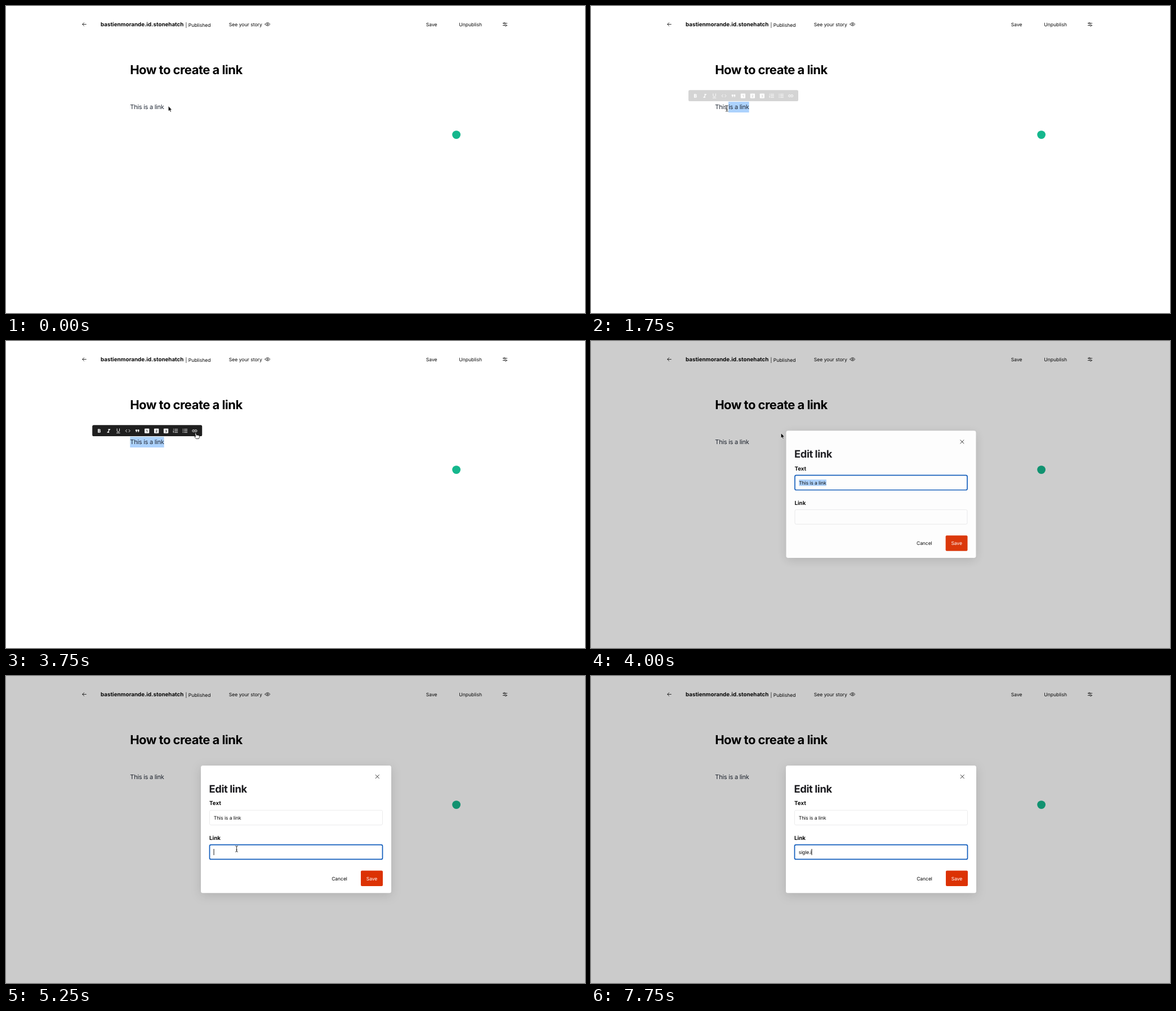
Recreate the animation shown at these times as an HTML page. Size 1028x545 px, loop 8000 ms.

```html
<!DOCTYPE html>
<html lang="en">
<head>
<meta charset="utf-8">
<title>How to create a link</title>
<style>
  html, body { margin: 0; width: 100%; height: 100%; overflow: hidden; background: #fff; }
  svg { display: block; width: 100vw; height: 100vh; }
  text { font: 400 8.57px Inter, "Open Sans", sans-serif; font-optical-sizing: none;
         text-rendering: geometricPrecision; fill: #080808; white-space: pre; }
  .label { font-size: 9.79px; font-weight: 700; }
  .title { font-size: 22px; font-weight: 700; letter-spacing: -.53px; fill: #000; }
  .heading { font-size: 18.36px; font-weight: 700; letter-spacing: -.42px; fill: #1b1b1f; }
  .body { font-size: 11px; letter-spacing: -.26px; fill: #232b38; }
  .field { letter-spacing: -.08px; }
  .line { fill: none; stroke: #111; stroke-width: .85; stroke-linecap: round; stroke-linejoin: round; }
  .sel { fill: #acd2fd; }
  .icon { fill: #fff; }
  .icon .stroke { fill: none; stroke: #fff; stroke-width: 2; }
  .icon text { font-size: 13px; font-weight: 700; fill: #1f1f1f; text-anchor: middle; }
  .icon .num { font-size: 7px; fill: #fff; }
</style>
</head>
<body>
<svg viewBox="0 0 1028 545" xmlns="http://www.w3.org/2000/svg">
  <!-- top bar -->
  <path class="line" d="M142.3 32.5H135.9M138.6 29.6L135.7 32.5L138.6 35.4"/>
  <text class="label" x="168" y="36.3">bastienmorande.id.stonehatch</text>
  <text x="318.6" y="36.6">| Published</text>
  <text x="395.8" y="35.8">See your story</text>
  <path class="line" d="M459.9 32.4Q464.4 26.6 468.9 32.4Q464.4 38.2 459.9 32.4Z"/>
  <circle class="line" cx="464.4" cy="32.4" r="1.3"/>
  <text x="745.8" y="35.8">Save</text>
  <text x="804.3" y="35.8">Unpublish</text>
  <path class="line" d="M882.3 30.7h1M886.3 30.7h3.4M882.3 34.5h3.4M888.7 34.5h1"/>
  <circle class="line" cx="884.8" cy="30.7" r="1.4"/>
  <circle class="line" cx="887.2" cy="34.5" r="1.4"/>

  <!-- story -->
  <text class="title" x="220.2" y="121.3">How to create a link</text>
  <rect class="sel" id="pick" y="170" height="19"/>
  <text class="body" x="220.3" y="183.2">This is a link</text>
  <rect id="caret" x="280" y="172" width="1" height="14"/>
  <circle cx="799.6" cy="228.6" r="7.4" fill="#15b78d"/>

  <g id="bar">
    <rect y="149.3" width="195" height="19.7" rx="2.6" fill="#1f1f1f"/>
    <g id="icons"></g>
  </g>

  <!-- dialog -->
  <rect id="shade" width="1028" height="545" opacity=".204"/>
  <g id="dialog">
    <rect x="346" y="159" width="338" height="226.3" rx="3.5" fill="#fff"
          style="filter:drop-shadow(0 4px 9px rgba(0,0,0,.13))"/>
    <path class="line" d="M656.2 175.5l6.2 6.2M662.4 175.5l-6.2 6.2"/>
    <text class="heading" x="360.6" y="206.6">Edit link</text>
    <text class="label" x="361" y="229.4">Text</text>
    <rect id="textBox" x="361.5" y="238.3" width="307" height="26.2" rx="2.5" fill="#fff"/>
    <rect class="sel" id="textPick" x="368.8" y="245.8" width="48.8" height="11.4"/>
    <text class="field" x="368.7" y="254.5">This is a link</text>
    <text class="label" x="361" y="290.6">Link</text>
    <rect id="linkBox" x="361.5" y="299.6" width="307" height="25.8" rx="2.5" fill="#fff"/>
    <text class="field" id="link" x="368.7" y="315.8"></text>
    <rect id="linkCaret" y="307" width=".9" height="11"/>
    <text class="field" x="578.2" y="362.6">Cancel</text>
    <rect x="630" y="345.5" width="39" height="27.6" rx="2" fill="#dc3204"/>
    <text class="field" x="649.5" y="362.6" text-anchor="middle" style="fill:#fff">Save</text>
  </g>

  <!-- pointers, each with its hot spot at 0,0 -->
  <path id="arrow" d="M0 0V9.2L2.1 7.3L3.6 10.7L5.1 10L3.7 6.8H6.5Z"
        fill="#000" stroke="#fff" stroke-width=".7"/>
  <g id="beam" fill="none">
    <path d="M-2.2-5.2Q0-5.2 0-3.8V3.8Q0 5.2-2.2 5.2M2.2-5.2Q0-5.2 0-3.8M0 3.8Q0 5.2 2.2 5.2M-1.2 1.8H1.2"
          stroke="#fff" stroke-width="1.8"/>
    <path d="M-2.2-5.2Q0-5.2 0-3.8V3.8Q0 5.2-2.2 5.2M2.2-5.2Q0-5.2 0-3.8M0 3.8Q0 5.2 2.2 5.2M-1.2 1.8H1.2"
          stroke="#111" stroke-width=".9"/>
  </g>
  <path id="hand" fill="#fff" stroke="#111" stroke-width=".8" stroke-linejoin="round"
        d="M-1 .3Q0-.8 .9.3L1.9 3.6Q3 2.7 3.7 3.5Q4.8 2.9 5.4 3.9Q6.6 3.7 6.8 4.9V7.2L5.8 9.7H1.1L-1.9 6.3Q-2 5 .2 5.9Z"/>
</svg>
<script>
const $ = id => document.getElementById(id);
const set = (id, attrs) => {
  for (const name in attrs) $(id).setAttribute(name, attrs[name]);
};
const show = (id, on) => set(id, { visibility: on ? "visible" : "hidden" });

// Toolbar icons on a 24-unit grid
const stroke = d => `<path class="stroke" d="${d}"/>`;
const digit = n => `<rect x="3" y="3" width="18" height="18" rx="2"/><text x="12" y="16.8">${n}</text>`;
const rows = "M8 6H21M8 12H21M8 18H21";
const each = make => [6, 12, 18].map(make).join("");
const icons = [
  `<path fill-rule="evenodd" d="M7 5H13Q17.3 5 17.3 9Q17.3 11 15.6 11.8Q17.8 12.7 17.8 15.2Q17.8 19 14 19H7ZM10 7.5V10.5H13Q14.5 10.5 14.5 9T13 7.5ZM10 13.5V16.5H13.5Q15 16.5 15 15T13.5 13.5Z"/>`,
  `<path d="M10 5V8H12.2L8.8 16H6V19H14V16H11.8L15.2 8H18V5Z"/>`,
  stroke("M7.2 3V11A4.8 4.8 0 0 0 16.8 11V3M5 20H19"),
  stroke("M8.7 6.7L3.4 12L8.7 17.3M15.3 6.7L20.6 12L15.3 17.3"),
  `<path d="M6 17H9L11 13V7H5V13H8ZM14 17H17L19 13V7H13V13H16Z"/>`,
  digit(1), digit(2), digit(3),
  stroke(rows) + each((y, i) => `<text class="num" x="4" y="${y + 2.5}">${i + 1}</text>`),
  stroke(rows) + each(y => `<circle cx="4" cy="${y}" r="1.5"/>`),
  stroke("M11 8H7A4 4 0 0 0 7 16H11M13 8H17A4 4 0 0 1 17 16H13M8 12H16")
];
$("icons").innerHTML = icons.map((art, i) =>
  `<g class="icon" transform="translate(${6.7 + i * 16.95} 154) scale(.459)">${art}</g>`).join("");

// Pointer: start time, shape, x, y
const pointer = [
  [0, "arrow", 288.2, 177.6],
  [1250, "beam", 284, 181],
  [1500, "beam", 280, 182],
  [1750, "beam", 241.3, 181.8],
  [2000, "beam", 223, 185],
  [2250, "beam", 221.5, 187.4],
  [2500, "beam", 236, 184],
  [2750, "arrow", 281, 172],
  [3000, "arrow", 318, 164],
  [3250, "hand", 334, 163],
  [3500, "hand", 336, 163.5],
  [3750, "hand", 336.5, 163.8],
  [4000, "arrow", 337.2, 163.4],
  [4500, "arrow", 372, 222],
  [4750, "arrow", 409.4, 283.6],
  [5000, "beam", 409.5, 307],
  [5750, "", 0, 0]
];
const typed = [[0, ""], [6000, "s"], [6250, "si"], [6500, "sig"], [6750, "sigle"], [7250, "sigle."], [7750, "sigle.i"]];
const latest = (list, t) => list.filter(row => row[0] <= t).pop();

function box(id, focused) {
  set(id, { stroke: focused ? "#105cbc" : "#e6e6e8", "stroke-width": focused ? 1.7 : .8 });
}

function draw() {
  const t = performance.now() % 8000;

  const [, shape, x, y] = latest(pointer, t);
  for (const id of ["arrow", "beam", "hand"]) show(id, id === shape);
  if (shape) set(shape, { transform: `translate(${x} ${y})` });

  const open = t >= 4000;
  const selecting = t >= 1750 && !open;
  const left = t < 2000 ? 244 : 220.3;
  show("caret", t >= 750 && t < 1750);
  show("pick", selecting);
  set("pick", { x: left, width: 280.6 - left });
  show("bar", selecting);
  set("bar", {
    transform: `translate(${t < 2000 ? 173 : 153.2} 0)`,
    opacity: t < 2000 ? .19 : 1
  });

  const settling = t < 4250;
  show("shade", open);
  set("shade", { opacity: settling ? .197 : .204 });
  set("dialog", {
    display: open ? "inline" : "none",
    opacity: settling ? .96 : 1,
    transform: settling ? "translate(515 272) scale(.997) translate(-515 -272)" : ""
  });

  const onLink = t >= 5250;
  box("textBox", !onLink);
  box("linkBox", onLink);
  show("textPick", open && !onLink);
  show("linkCaret", onLink);
  const text = latest(typed, t)[1];
  if ($("link").textContent !== text) $("link").textContent = text;
  set("linkCaret", { x: 368.6 + (text && open ? $("link").getComputedTextLength() : 0) });

  requestAnimationFrame(draw);
}
draw();
</script>
</body>
</html>
```
